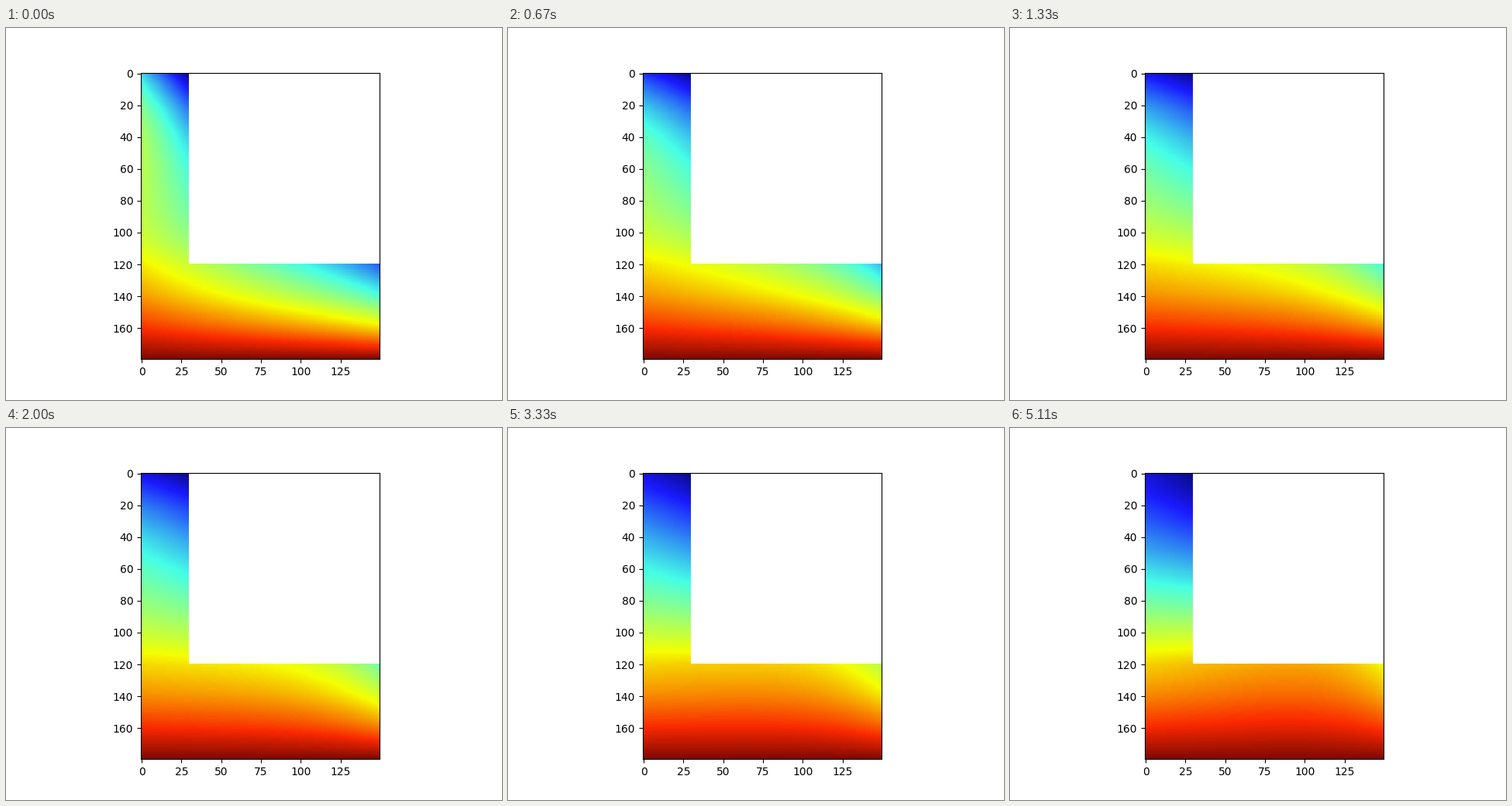
These frames come from a looping animation (640x480 px, 5.56 s). A matplotlib script:

```python
import numpy as np
import matplotlib.pyplot as plt
from matplotlib.animation import FuncAnimation
from matplotlib.colors import LinearSegmentedColormap

ROWS, COLS = 180, 150
WALL_X, WALL_Y = 30, 120
LOOP_MS, TICK_MS = 5560, 40
STEP_MS, LAST_MS, LAST_STEP = 333.4, 5110, 15

HEAT = LinearSegmentedColormap.from_list("heat", [
    (0, "#0a0a82"), (.11, "#1a1aff"), (.38, "#46ffe6"),
    (.64, "#f5ff00"), (.875, "#fa2800"), (1, "#820a00"),
], N=256)

Y, X = np.mgrid[:ROWS, :COLS]
U = X / (COLS - 1)                           # along the base
W = np.clip(X / (WALL_X - 1), 0, 1)          # across the arm
S = np.clip(Y / WALL_Y, 0, 1)                # down the arm
DEPTH = np.clip((ROWS - 1 - Y) / (ROWS - 1 - WALL_Y), 0, 1)
SOLID = (X >= WALL_X) & (Y < WALL_Y)


def temperature(step):
    """Relative temperature: hot floor, cold arm top, cold far corner."""
    p = np.log1p(step) / np.log1p(LAST_STEP)

    # Temperature drop from the floor to the level of the wall's underside;
    # the far end warms up later than the rest
    first = .34 + .4 * U + .07 * U ** 6
    last = .31 - .1 * U + .15 * U ** 5
    drop = first + (last - first) * p ** (1 + .5 * U ** 3)
    base = 1 - drop * DEPTH * (4 - DEPTH) / 3

    # The arm cools from the top; warm air inside it fades with time
    top = .08 - .07 * W
    arm = top + (1 - drop - top) * S ** 1.25
    arm += (.2 - .03 * W) * (1 - p * p) * 6.75 * S * (1 - S) ** 2
    arm += .25 * (1 - W) * (1 - S) ** 2 * np.exp(-step / 1.3)

    field = np.where(Y < WALL_Y, arm, base)
    return np.ma.masked_where(SOLID, np.clip(field, 0, 1))


def step_at(tick):
    ms = (tick + 1) * TICK_MS - 1
    if ms >= LAST_MS:
        return LAST_STEP
    return min(int(ms / STEP_MS), LAST_STEP - 1)


fig, ax = plt.subplots(figsize=(6.4, 4.8), dpi=100)
image = ax.imshow(temperature(0), cmap=HEAT, vmin=0, vmax=1,
                  interpolation="nearest")


def update(tick):
    image.set_data(temperature(step_at(tick)))
    return (image,)


anim = FuncAnimation(fig, update, frames=LOOP_MS // TICK_MS,
                     interval=TICK_MS, repeat=True, repeat_delay=0)
plt.show()
```
